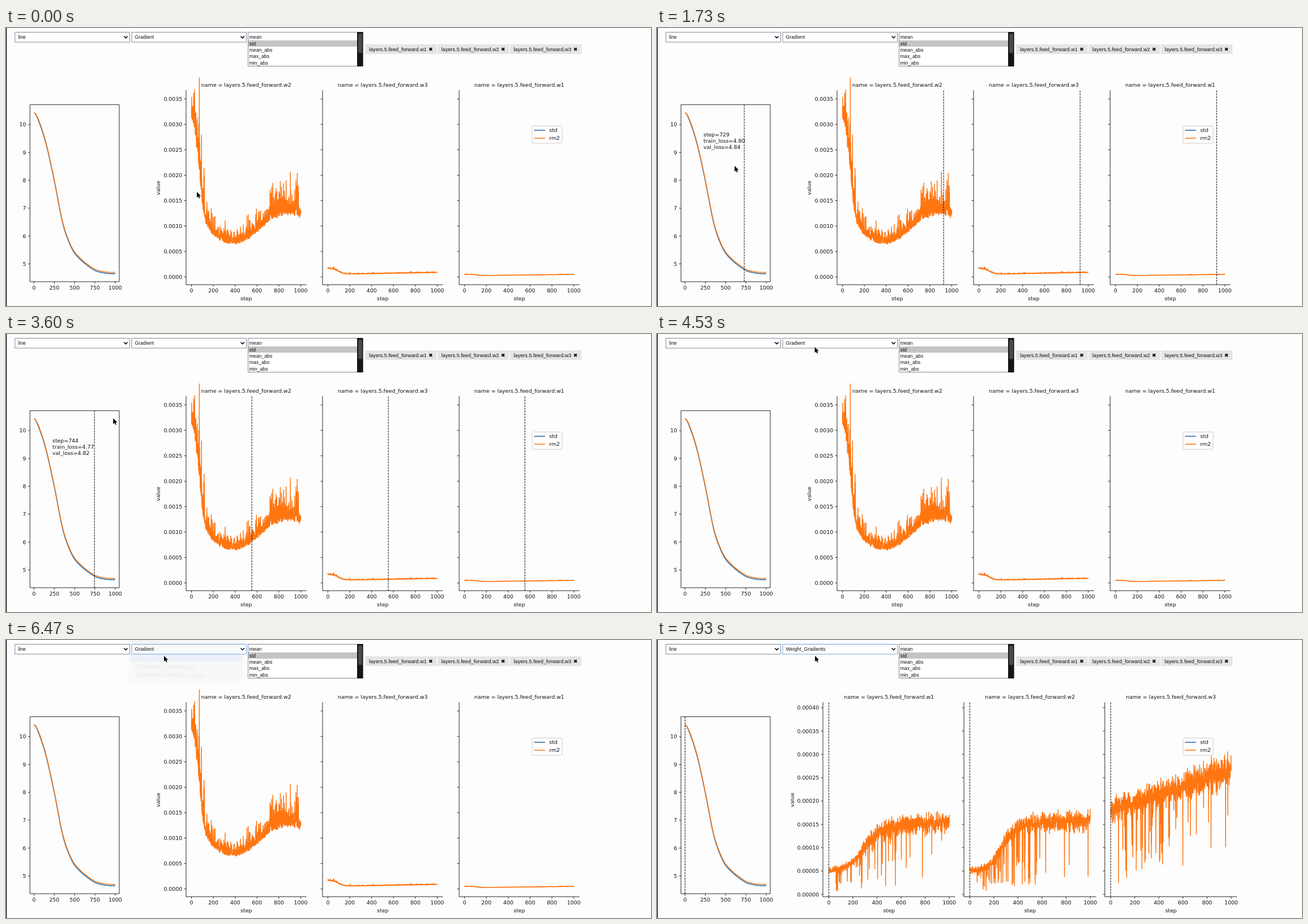
Animation, 1139 px wide and 492 px high, one loop 8 s. Source, as an HTML page with a canvas:

```html
<!DOCTYPE html>
<html lang="en">
<head>
<meta charset="utf-8">
<title>Training dashboard</title>
<style>
html, body { margin: 0; width: 100%; height: 100%; overflow: hidden; background: #fdfdfd; }
canvas { display: block; }
</style>
</head>
<body>
<canvas id="stage" width="1139" height="492"></canvas>
<script>
const ctx = document.getElementById('stage').getContext('2d');
const LOOP = 8000, FPS = 15;
const INK = '#111', BLUE = '#1c64a6', ORANGE = '#ff7510';
const PLOT_FONT = '9.4px "DejaVu Sans", sans-serif';
const UI_FONT = '8.75px "Liberation Sans", Arial, sans-serif';
const MENU_FONT = '9.12px "Liberation Sans", Arial, sans-serif';

const clamp = (v, a, b) => Math.min(b, Math.max(a, v));
const ease = u => u * u * (3 - 2 * u);
const mix = (a, b, u) => a + (b - a) * u;
const rise = (s, mid, width) => 1 / (1 + Math.exp((mid - s) / width));
const fall = (s, mid, width) => 1 - rise(s, mid, width);

function rng(seed) {
  return () => {
    seed = seed + 0x6D2B79F5 | 0;
    let n = Math.imul(seed ^ seed >>> 15, 1 | seed);
    n = n + Math.imul(n ^ n >>> 7, 61 | n) ^ n;
    return ((n ^ n >>> 14) >>> 0) / 4294967296;
  };
}

// ---------- loss curves: smooth line through a few points ----------
const LOSS = [[0, 10.42], [60, 10.1], [150, 9.28], [250, 7.97], [350, 6.5],
  [430, 5.78], [516, 5.322], [729, 4.798], [870, 4.67], [1000, 4.65]];

function slope(i) {
  if (i === 0 || i === LOSS.length - 1) return 0;
  const [a, b] = [LOSS[i - 1], LOSS[i + 1]];
  return (b[1] - a[1]) / (b[0] - a[0]);
}
function trainLoss(s) {
  let i = 0;
  while (i < LOSS.length - 2 && s > LOSS[i + 1][0]) i++;
  const [x0, y0] = LOSS[i], [x1, y1] = LOSS[i + 1], h = x1 - x0, u = (s - x0) / h;
  return mix(y0, y1, ease(u)) + h * u * (1 - u) * ((1 - u) * slope(i) - u * slope(i + 1));
}
const valLoss = s => trainLoss(s) + .045 * Math.min(1, s / 60);
const lossX = s => 49.5 + s * .1434;
const lossY = v => 171 + (10 - v) * 49.3;

function lossPath(fn) {
  const p = new Path2D();
  for (let s = 0; s <= 1000; s += 4) p.lineTo(lossX(s), lossY(fn(s)));
  return p;
}
const trainPath = lossPath(trainLoss), valPath = lossPath(valLoss);

// ---------- noisy series, in tick units ----------
// Skewed noise: a flat lower edge with upward spikes.
function skewed(spread) {
  return (rand, s) => Math.exp(spread(s) * (-Math.log((rand() + 1e-6) * (rand() + 1e-6)) - 2));
}
// Even noise with sudden drops, frequent in the first half.
function dipping(rand, s) {
  const even = 1 + .13 * (rand() + rand() + rand() - 1.5);
  const chance = s < 60 ? 0 : s < 560 ? .1 : .02;
  const drop = rand() < chance, depth = rand();
  return drop ? even * (1 - .88 * depth) : even;
}

function chart(set, seed) {
  const rand = rng(seed);
  for (const p of set.panels) {
    p.path = new Path2D();
    p.x0 = p.left + set.inset;
    for (let s = 0; s <= 1000; s++)
      p.path.lineTo(p.x0 + s * set.dx, set.zero - set.gap * p.mean(s) * p.noise(rand, s));
  }
  return set;
}

const gradient = chart({
  labelX: 269, zero: 440.5, gap: 45, count: 8, unit: .0005, digits: 4,
  width: 212.5, inset: 9.5, dx: .193,
  panels: [
    { name: 'w2', left: 318,
      mean: s => 2.1 - .65 * Math.cos((s - 380) * Math.PI / 500) + 4 * fall(s, 77, 22),
      noise: skewed(s => .065 - .045 * Math.exp(-s / 40) + .03 * Math.exp(-(((s - 95) / 30) ** 2))) },
    { name: 'w3', left: 559, mean: s => .1 + s * 8e-5 + .25 * fall(s, 95, 25), noise: skewed(() => .045) },
    { name: 'w1', left: 800.2, mean: s => .045 + s * 5.5e-5 + .055 * fall(s, 110, 20), noise: skewed(() => .04) }
  ]
}, 12);

const weights = chart({
  labelX: 239, zero: 450.2, gap: 41.3, count: 9, unit: .00005, digits: 5,
  width: 233.5, inset: 10.4, dx: .2127,
  panels: [
    { name: 'w1', left: 293, mean: s => 1 + s * 4e-4 + 1.7 * rise(s, 285, 60), noise: dipping },
    { name: 'w2', left: 542, mean: s => 1 + s * 1.5e-4 + 2 * rise(s, 265, 55), noise: dipping },
    { name: 'w3', left: 790.8, mean: s => 3.6 + s * 1.75e-3, noise: dipping }
  ]
}, 44);

// ---------- drawing helpers ----------
// y is the middle of the digits
function text(str, x, y, { font = PLOT_FONT, align = 'left', color = INK } = {}) {
  ctx.font = font;
  ctx.textAlign = align;
  ctx.fillStyle = color;
  ctx.fillText(str, x, y + 3.4);
}
function line(x0, y0, x1, y1, color = INK, width = .9) {
  ctx.strokeStyle = color;
  ctx.lineWidth = width;
  ctx.beginPath();
  ctx.moveTo(x0, y0);
  ctx.lineTo(x1, y1);
  ctx.stroke();
}
function polyline(points, color, width) {
  ctx.strokeStyle = color;
  ctx.lineWidth = width;
  ctx.beginPath();
  for (const [x, y] of points) ctx.lineTo(x, y);
  ctx.stroke();
}
function fill(x, y, w, h, color, r = 0) {
  ctx.fillStyle = color;
  ctx.beginPath();
  ctx.roundRect(x, y, w, h, r);
  ctx.fill();
}
function box(x, y, w, h, color, r = 0, width = 1) {
  ctx.strokeStyle = color;
  ctx.lineWidth = width;
  ctx.beginPath();
  ctx.roundRect(x, y, w, h, r);
  ctx.stroke();
}
function curve(path, color) {
  ctx.strokeStyle = color;
  ctx.lineWidth = 1.45;
  ctx.lineJoin = 'round';
  ctx.stroke(path);
}
function marker(x, top, bottom) {
  ctx.setLineDash([3.5, 1.5]);
  line(x, bottom, x, top, '#000', .95);
  ctx.setLineDash([]);
}

// ---------- controls ----------
function select(x, label, focused) {
  fill(x, 7, 203, 18, '#fff');
  box(x, 7.5, 202.5, 17.5, focused ? '#6ea6e6' : '#808a98');
  text(label, x + 5.5, 16, { font: UI_FONT });
  polyline([[x + 192.5, 14.5], [x + 195.7, 17.7], [x + 198.9, 14.5]], INK, 1.7);
}
function statList() {
  fill(428, 7, 202, 61, '#fff');
  fill(428, 22, 192, 11, '#c4c4c4');
  ['mean', 'std', 'mean_abs', 'max_abs', 'min_abs'].forEach((s, i) =>
    text(s, 429.5, 16 + i * 11.3, { font: UI_FONT }));
  box(427.5, 7.5, 202.5, 60, '#808a98');
  fill(620, 7, 10.5, 61, '#151515');
  fill(622, 9.5, 7, 35, '#4a4a4a', 3.5);
}
function tag(x, name) {
  fill(x, 29, 126.5, 17, '#e5e5e5');
  text('layers.5.feed_forward.' + name, x + 6.7, 37.5, { font: MENU_FONT });
  const cx = x + 115.7;
  for (const d of [-2.3, 2.3]) line(cx - 2.3, 37.5 - d, cx + 2.3, 37.5 + d, INK, 2.1);
}
function menu(alpha, lit) {
  ctx.save();
  ctx.globalAlpha = alpha;
  ctx.shadowColor = 'rgba(0,0,0,.35)';
  ctx.shadowBlur = 9;
  ctx.shadowOffsetY = 3;
  fill(216, -40, 203.5, 112, '#dfe2e5', 5);
  ctx.shadowColor = 'transparent';
  box(216, -40, 203.5, 112, '#b9bcc0', 5, .8);
  if (lit) fill(219, lit * 15 - 5.7, 198, 14.4, '#3b8ffb', 3);
  ['Activation', 'Gradient', 'Weight_Gradients', 'Optimiser_State.exp_avg', 'Optimiser_State.exp_avg_sq']
    .forEach((s, i) => text(s, 232.5, 1.5 + i * 15, { font: MENU_FONT, color: i === lit ? '#fff' : '#222' }));
  polyline([[223.5, 17], [225.5, 19.3], [229, 13.3]], lit === 1 ? '#fff' : '#222', 1.3);
  ctx.restore();
}
function pointer(x, y) {
  ctx.beginPath();
  [[0, 0], [0, 10.2], [2.3, 8.1], [3.9, 11.6], [5.6, 10.8], [4.1, 7.4], [7.2, 7.2]]
    .forEach(([a, b]) => ctx.lineTo(x + a, y + b));
  ctx.closePath();
  ctx.strokeStyle = '#fff';
  ctx.lineWidth = 1.6;
  ctx.stroke();
  ctx.fillStyle = '#000';
  ctx.fill();
}

// ---------- charts ----------
function lossChart(step, label) {
  curve(trainPath, BLUE);
  curve(valPath, ORANGE);
  if (step !== null) marker(lossX(step), 136, 449);
  box(42.3, 135.7, 157.7, 313.3, INK, 0, .9);
  for (let v = 5; v <= 10; v++) {
    line(39, lossY(v), 42.3, lossY(v));
    text(v, 35.5, lossY(v), { align: 'right' });
  }
  for (let s = 0; s <= 1000; s += 250) {
    line(lossX(s), 449, lossX(s), 452.4);
    text(s, lossX(s), 460, { align: 'center' });
  }
  if (label) {
    const s = Math.round(step);
    ['step=' + s, 'train_loss=' + trainLoss(s).toFixed(2), 'val_loss=' + valLoss(s).toFixed(2)]
      .forEach((str, i) => text(str, 82, 188.5 + i * 11.2));
  }
}
function panels(set, step) {
  set.panels.forEach((p, i) => {
    const mid = p.left + set.width / 2;
    curve(p.path, ORANGE);
    if (step !== null) marker(p.x0 + step * set.dx, 110, 454);
    line(p.left, 110, p.left, 454.5);
    line(p.left, 454.3, p.left + set.width, 454.3);
    for (let k = 0; k < set.count; k++) {
      const y = set.zero - k * set.gap;
      line(p.left - 3.4, y, p.left, y);
      if (!i) text((k * set.unit).toFixed(set.digits), p.left - 6.8, y, { align: 'right' });
    }
    for (let s = 0; s <= 1000; s += 200) {
      const x = p.x0 + s * set.dx;
      line(x, 454.3, x, 457.7);
      text(s, x, 465, { align: 'center' });
    }
    text('name = layers.5.feed_forward.' + p.name, mid, 101, { align: 'center' });
    text('step', mid, 478.3, { align: 'center' });
  });
  ctx.save();
  ctx.translate(set.labelX, 283);
  ctx.rotate(-Math.PI / 2);
  text('value', 0, 0, { align: 'center' });
  ctx.restore();
}
function legend() {
  fill(929, 173.5, 53, 30.5, 'rgba(255,255,255,.8)', 2);
  box(929, 173.5, 53, 30.5, '#ccc', 2);
  [['std', BLUE], ['rm2', ORANGE]].forEach(([name, color], i) => {
    line(932.5, 181 + i * 14, 952, 181 + i * 14, color, 1.5);
    text(name, 959.3, 181 + i * 14);
  });
}

// ---------- timeline ----------
// Where the pointer rests: [arrive, leave, x, y]
const STOPS = [[0, 70, 337, 290], [760, 1300, 183, 250], [1730, 2520, 137, 244],
  [2750, 3070, 123.5, 242], [4250, 4750, 278.5, 23], [5050, LOOP, 279, 28]];

function pointerAt(t) {
  const i = Math.max(0, STOPS.findLastIndex(stop => stop[0] <= t));
  const [, leave, x, y] = STOPS[i];
  if (t <= leave) return [x, y];
  const [arrive, , nx, ny] = STOPS[i + 1];
  const u = ease((t - leave) / (arrive - leave));
  return [mix(x, nx, u), mix(y, ny, u)];
}

// Step under the pointer, or null when it is off the loss chart.
function hoverStep(t) {
  const [x, y] = pointerAt(t);
  if (x < 42 || x > 200 || y < 136 || y > 449) return null;
  return clamp((x - 49.5) / .1434, 0, 1000);
}

function draw(t) {
  const reset = t >= 6930, swapped = t >= 7660, open = t >= 4660;
  fill(0, 0, 1139, 492, '#fdfdfd');
  fill(0, 0, 1.2, 492, '#000');

  select(15.8, 'line', false);
  select(222, t >= 6590 ? 'Weight_Gradients' : 'Gradient', open);
  statList();
  ['w1', 'w2', 'w3'].forEach((name, i) => tag(634.3 + i * 127.8, name));

  // The charts follow the pointer late, the large ones more so.
  const step = reset ? 0 : hoverStep(t - 181);
  lossChart(step, step !== null && !reset);
  panels(swapped ? weights : gradient, swapped ? 0 : hoverStep(t - 400));
  legend();

  const [x, y] = pointerAt(t);
  const alpha = clamp((6480 - t) / 230, 0, 1);
  if (open && alpha > 0) {
    const blink = t >= 6170 && t < 6230;
    menu(alpha, blink ? 0 : y >= 24 ? 2 : 1);
  }
  pointer(x, y);
}

let last = -1;
function tick(now) {
  const frame = Math.floor((now % LOOP + 5) * FPS / 1000) % (LOOP * FPS / 1000);
  if (frame !== last) draw((last = frame) * 1000 / FPS);
  requestAnimationFrame(tick);
}
tick(performance.now());
</script>
</body>
</html>
```
